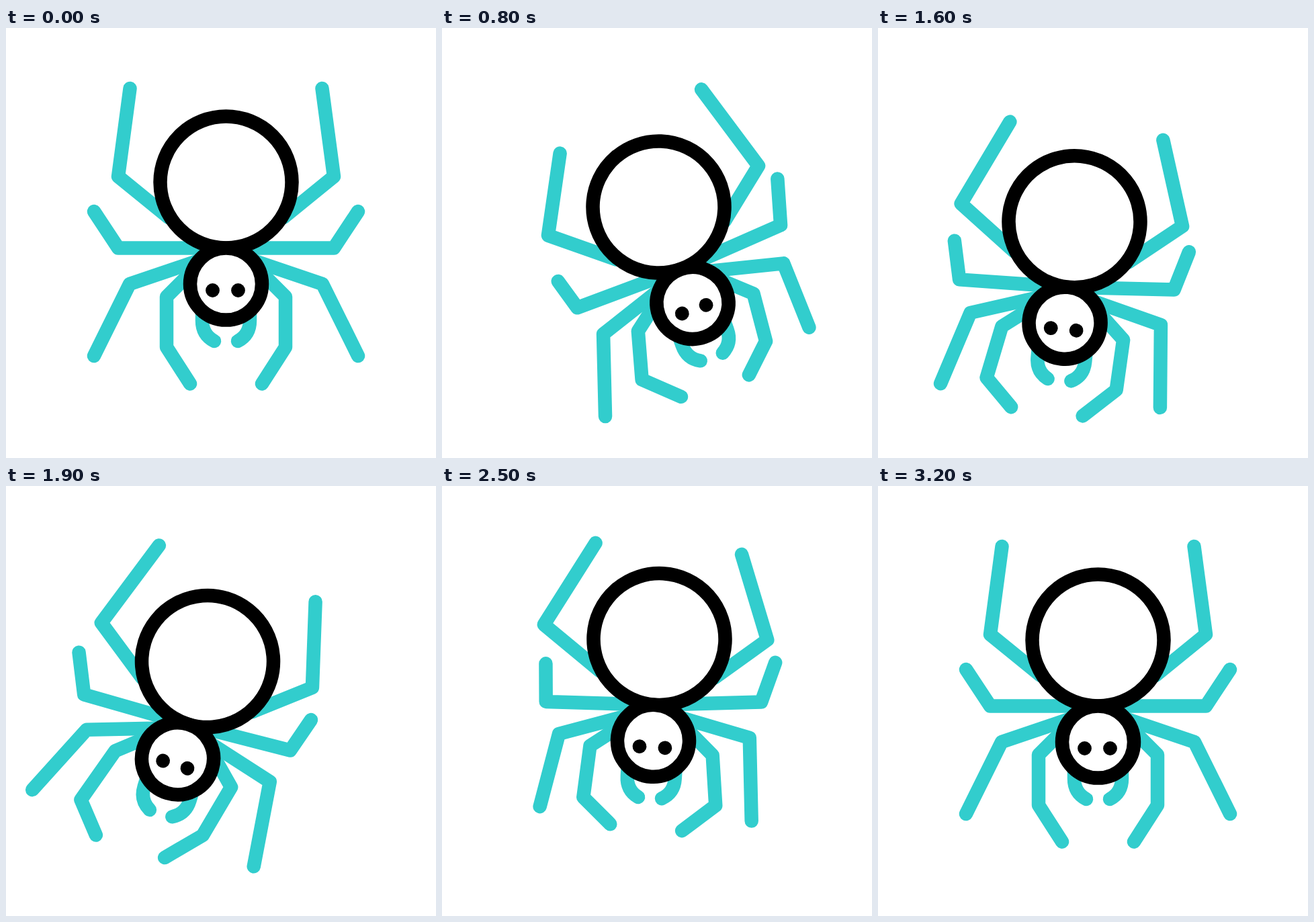
These frames come from a looping animation (640 px wide and 640 px high, 3.6 s). An HTML page:

```html
<!DOCTYPE html>
<html lang="en">
<head>
<meta charset="utf-8">
<title>Spider</title>
<style>
  html, body { margin: 0; width: 100%; height: 100%; overflow: hidden; background: #fff; }
  svg { display: block; width: 100%; height: 100%; }
  .teal { fill: none; stroke: #32cdcd; stroke-width: 20.5; stroke-linecap: round; stroke-linejoin: round; }
  .ring { fill: #fff; stroke: #000; stroke-width: 20.5; }
</style>
</head>
<body>
<svg viewBox="0 0 640 640">
  <g id="legs" class="teal"></g>
  <!-- body space: the origin is the centre of the abdomen -->
  <g id="body">
    <path class="teal" d="M-35.5 190V206Q-35.5 227 -17.5 236.5M35.5 190V206Q35.5 227 17.5 236.5"/>
    <circle class="ring" r="98"/>
    <circle class="ring" cy="151.6" r="53.5"/>
    <circle cx="-20" cy="161" r="10.4"/>
    <circle cx="18" cy="161" r="10.4"/>
  </g>
</svg>
<script>
const LOOP = 3600, STEP = 20;

// Right legs at rest in body space, from hip to foot; the left ones mirror them.
// left, right: how far each joint after the hip moves on screen when a leg is fully curled.
const LEGS = [
  { rest: [[85.5, 52.5], [160.5, -8.5], [143, -139.5]],
    left: [[-13, -4], [43, 5]], right: [[0, 0], [-31, 5]] },
  { rest: [[0, 98], [160.5, 98], [196.5, 43.5]],
    left: [[-3, 5], [33, 5]], right: [[-3, -15], [-22, -22]] },
  { rest: [[27, 112], [143.5, 151.5], [196.5, 258.5]],
    left: [[3, -2], [38, 3]], right: [[0, -14], [-46, 1]] },
  { rest: [[52.5, 134.5], [88.5, 170.5], [88.5, 245.5], [53.5, 300]],
    left: [[-5, -7], [-9, -5], [0, -23]], right: [[1, -3], [13, -3], [0, -19]] }
];

// Body x, y and angle, curl of the legs, sideways drag of the feet.
const REST = [327.5, 229.5, 0, 0, 0];
const KEYS = [
  [120, REST],
  [360, [327.5, 233, -4.35, 0.63, 10]],
  [800, [322.5, 266.5, -19.45, 0.8, -16]],
  [1180, [306.5, 288, -14, 0.95, -4]],
  [1280, [299.5, 296.5, -11.8, 1, 1]],
  [1900, [300, 261, 17.06, 0.55, -27]],
  [2260, [319.5, 234, 5.7, 0.86, -6]],
  [2500, [323.5, 228, 3.4, 0.92, -2]],
  [2800, [322.5, 229, 4.2, 0.55, -3]],
  [3200, REST]
];

// Speed of value i at key k: the mean of both neighbours, weighted by time.
function speed(k, i) {
  if (k === 0 || k === KEYS.length - 1) return 0;
  const [[t0, a], [t1, b], [t2, c]] = KEYS.slice(k - 1, k + 2);
  const before = t1 - t0, after = t2 - t1;
  return ((b[i] - a[i]) / before * after + (c[i] - b[i]) / after * before) / (before + after);
}

function poseAt(time) {
  const next = KEYS.findIndex(([t]) => t > time);
  if (next <= 0) return REST;
  const k = next - 1, [t0, a] = KEYS[k], [t1, b] = KEYS[next];
  const span = t1 - t0, u = (time - t0) / span, w = 1 - u;
  return a.map((v, i) =>
    w * w * (1 + 2 * u) * v + u * u * (3 - 2 * u) * b[i] +
    span * u * w * (w * speed(k, i) - u * speed(next, i)));
}

const body = document.getElementById('body');
const limbs = ['left', 'right'].flatMap(side => LEGS.map((leg, row) => {
  const line = document.createElementNS('http://www.w3.org/2000/svg', 'polyline');
  document.getElementById('legs').appendChild(line);
  return { line, row, rest: leg.rest, curled: leg[side], flip: side === 'left' ? -1 : 1 };
}));

function draw(time) {
  const [x, y, angle, curl, drag] = poseAt(time);
  const cos = Math.cos(angle * Math.PI / 180), sin = Math.sin(angle * Math.PI / 180);
  body.setAttribute('transform', `translate(${x} ${y}) rotate(${angle})`);

  for (const { line, row, rest, curled, flip } of limbs) {
    const points = rest.map(([rx, ry], j) => {
      const [dx, dy] = j ? curled[j - 1] : [0, 0];
      const pull = j > 1 ? drag * row / 3 : 0; // front feet are dragged most
      return [
        x + flip * rx * cos - ry * sin + curl * dx + pull,
        y + flip * rx * sin + ry * cos + curl * dy
      ];
    });
    line.setAttribute('points', points.join(' '));
  }
}

const start = performance.now();
function tick() {
  const time = (performance.now() - start) % LOOP;
  draw(Math.floor(time / STEP) * STEP);
  requestAnimationFrame(tick);
}
tick();
</script>
</body>
</html>
```
